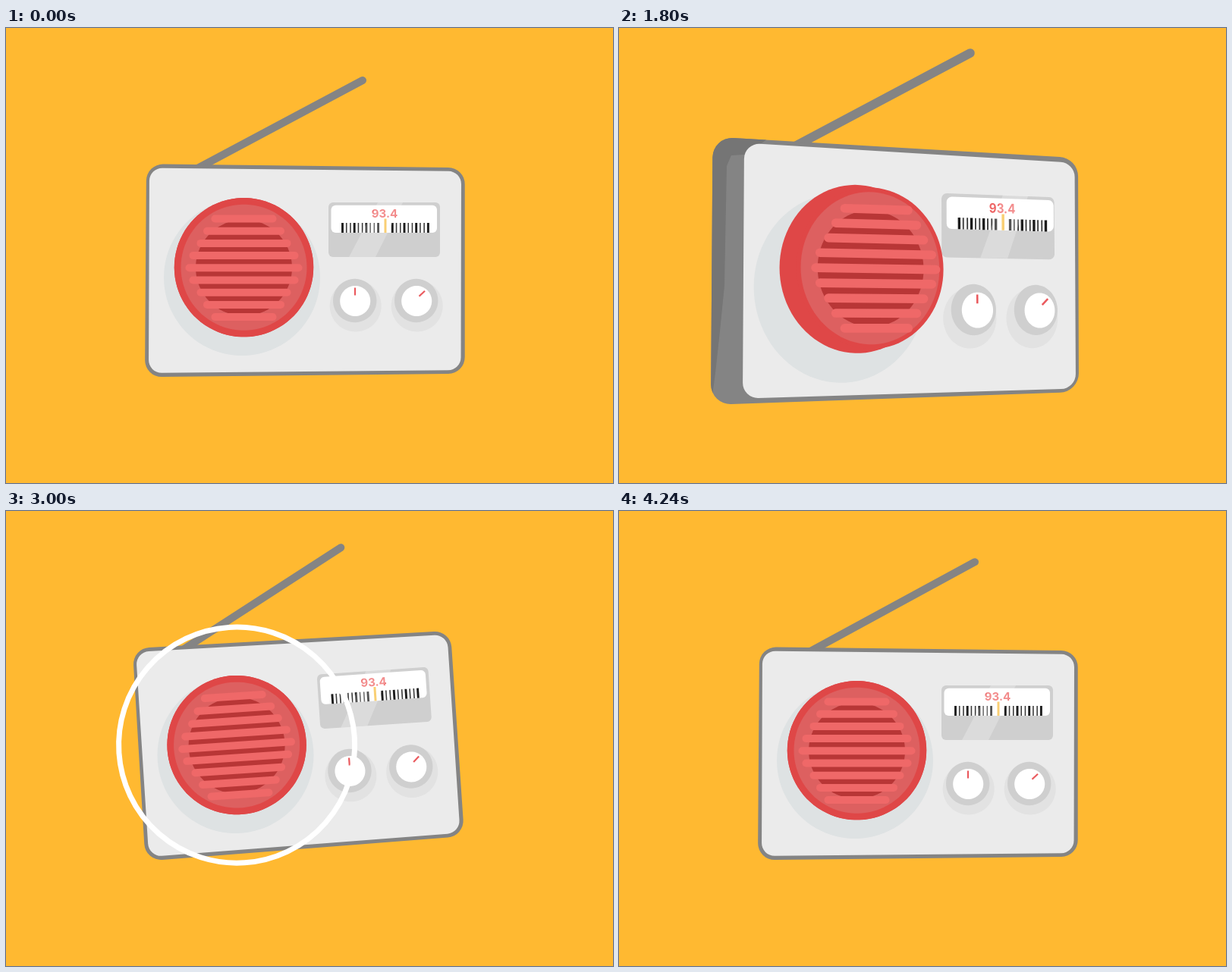
Recreate the animation shown at these times as an HTML page with a canvas. Size 800 px wide and 600 px high, loop 4.28 s.

```html
<!DOCTYPE html>
<html lang="en">
<head>
<meta charset="utf-8">
<title>Radio</title>
<style>
html, body { margin: 0; width: 100%; height: 100%; overflow: hidden; background: #ffb931; }
canvas { display: block; }
</style>
</head>
<body>
<canvas id="stage" width="800" height="600"></canvas>
<script>
const ctx = document.getElementById('stage').getContext('2d');
const LOOP = 4280, CX = 395, CY = 320, ZOOM = 1.165;

// Flat pose and fully turned pose; the turned one includes the zoom.
const FACE = [[189, 184.5], [600, 189], [599.5, 451], [188, 455]];
const FACE_TURNED = [[165, 151.5], [600.5, 178], [602, 475.5], [163, 488.5]];
const BODY = [[185, 179.3], [604.7, 184.2], [604.7, 455.8], [183, 460.3]];
const BODY_TURNED = [[123.5, 143.5], [605, 171.5], [606, 480], [121, 497]];
const SHADE = [[100, 120], [230, 120], [188, 152], [165, 167], [148, 168], [142, 182],
  [139, 340], [133, 400], [127, 455], [123, 485], [100, 490]];

// Keys: time, value pairs
const zoomKeys = [0, 0, 280, 0, 440, .14, 560, .5, 640, .79, 720, .96, 840, 1, 1880, 1,
  2080, .78, 2160, .56, 2240, .37, 2400, .21, 2560, .1, 2840, 0, LOOP, 0];
const turnKeys = [0, 0, 360, 0, 560, .18, 640, .5, 720, .82, 840, .97, 1240, 1.04, 1800, 1,
  1920, .93, 2080, .58, 2240, .18, 2400, .03, 2560, 0, LOOP, 0];
const rockKeys = [0, 0, 2800, 0, 2980, -3.9, 3180, -1.5, 3360, 3.9, 3600, 2.2, 3840, .85, 4080, 0, LOOP, 0];
const hopKeys = [0, 0, 2800, 0, 2980, -13, 3180, -8, 3360, -13, 3600, -3, 3840, 1, 4080, 0, LOOP, 0];
const aerialKeys = [-160, 1.8, 0, 0, 120, -.8, 280, .5, 440, 0, 2800, 0, 2980, 1, 3360, -1.1,
  3600, 1, 3840, -.8, 4120, 1.8, LOOP, 0, 4400, -.8];
const RINGS = [2840, 3280], RING_TIME = 350;

// Smooth monotone interpolation between keys
function track(k, t) {
  const n = k.length / 2;
  let i = 0;
  while (i < n - 2 && t >= k[2 * i + 2]) i++;
  const slope = j => j < 0 || j > n - 2 ? 0 : (k[2 * j + 3] - k[2 * j + 1]) / (k[2 * j + 2] - k[2 * j]);
  const tangent = j => {
    const a = slope(j - 1), b = slope(j);
    return a * b <= 0 ? 0 : 2 * a * b / (a + b);
  };
  const h = k[2 * i + 2] - k[2 * i], u = (t - k[2 * i]) / h, v = 1 - u;
  return v * v * (1 + 2 * u) * k[2 * i + 1] + u * u * (3 - 2 * u) * k[2 * i + 3]
    + h * u * v * (v * tangent(i) - u * tangent(i + 1));
}

// Projective map taking four points to four others
function projection(from, to) {
  const m = [];
  from.forEach(([x, y], i) => {
    const [X, Y] = to[i];
    m.push([x, y, 1, 0, 0, 0, -x * X, -y * X, X], [0, 0, 0, x, y, 1, -x * Y, -y * Y, Y]);
  });
  for (let c = 0; c < 8; c++) {
    let p = c;
    for (let r = c; r < 8; r++) if (Math.abs(m[r][c]) > Math.abs(m[p][c])) p = r;
    [m[c], m[p]] = [m[p], m[c]];
    for (let r = 0; r < 8; r++) {
      if (r === c) continue;
      const f = m[r][c] / m[c][c];
      for (let j = c; j < 9; j++) m[r][j] -= f * m[c][j];
    }
  }
  const h = m.map((row, i) => row[8] / row[i]);
  return (x, y) => {
    const w = h[6] * x + h[7] * y + 1;
    return [(h[0] * x + h[1] * y + h[2]) / w, (h[3] * x + h[4] * y + h[5]) / w];
  };
}

let turn, project;
const unzoom = ([x, y]) => [CX + (x - CX) / ZOOM, CY + (y - CY) / ZOOM];
const blend = (a, b) => {
  const c = unzoom(b);
  return [a[0] + (c[0] - a[0]) * turn, a[1] + (c[1] - a[1]) * turn];
};
// A point on the face, pushed aside by its depth as the radio turns
function at(x, y, depth = 0, drop = 0) {
  const p = project(x, y);
  return [p[0] + depth * turn / ZOOM, p[1] + drop * turn / ZOOM];
}

function path(pts) {
  ctx.beginPath();
  pts.forEach(p => ctx.lineTo(...p));
  ctx.closePath();
}
function fill(color) {
  ctx.fillStyle = color;
  ctx.fill();
}
function rounded(q, radius) {
  ctx.beginPath();
  ctx.moveTo((q[0][0] + q[1][0]) / 2, (q[0][1] + q[1][1]) / 2);
  for (let i = 1; i < 5; i++) ctx.arcTo(...q[i % 4], ...q[(i + 1) % 4], radius);
  ctx.closePath();
}
const rect = (x0, y0, x1, y1, d) => [at(x0, y0, d), at(x1, y0, d), at(x1, y1, d), at(x0, y1, d)];
function disc(x, y, r, color, depth, drop) {
  const pts = [];
  for (let i = 0; i < 90; i++) {
    const a = i * Math.PI / 45;
    pts.push(at(x + r * Math.cos(a), y + r * Math.sin(a), depth, drop));
  }
  path(pts);
  fill(color);
}
function line(a, b, width, color, cap = 'butt') {
  ctx.beginPath();
  ctx.moveTo(...a);
  ctx.lineTo(...b);
  ctx.lineWidth = width;
  ctx.strokeStyle = color;
  ctx.lineCap = cap;
  ctx.stroke();
}

function drawAerial(t) {
  const base = blend([245, 189], [228, 158]), tip = blend([470, 69], [463, 33]);
  const a = -track(aerialKeys, t) * Math.PI / 180;
  const dx = tip[0] - base[0], dy = tip[1] - base[1];
  const end = [base[0] + dx * Math.cos(a) - dy * Math.sin(a), base[1] + dx * Math.sin(a) + dy * Math.cos(a)];
  line(base, end, 10, '#848484', 'round');
}

function drawBody() {
  rounded(BODY.map((p, i) => blend(p, BODY_TURNED[i])), 22);
  fill('#848484');
  ctx.save();
  ctx.clip();
  path(SHADE.map(p => blend([p[0] - 4, unzoom(p)[1]], p)));
  fill('#757575');
  ctx.restore();
  rounded(FACE.map((p, i) => blend(p, FACE_TURNED[i])), 17);
  fill('#ebebeb');
}

function drawSpeaker() {
  const x = 313.5, y = 315.7;
  disc(311, 329, 103, '#dee2e3', -9, 10);
  disc(x, y, 91.7, '#df4747', 9, 1);
  disc(x, y, 91.7 - 3.7 * Math.min(1, turn), '#df4747', 27);
  disc(x, y, 83, '#dd6060', 27);
  disc(x, y + .5, 63.5, '#b83636', 27);
  [77, 72, 62, 53.5, 43].forEach((w, i) => {
    for (const s of i ? [-1, 1] : [1]) {
      const by = 316.3 + s * 16.2 * i;
      line(at(x - w + 5, by, 34), at(x + w - 5, by, 34), 10, '#ef6868', 'round');
    }
  });
}

function drawDisplay() {
  rounded(rect(425, 230, 572, 302), 6);
  fill('#cfcfcf');
  rounded(rect(428.5, 233.7, 568, 270, 3), 6);
  fill('#fff');

  const o = at(499, 245, 4), px = at(500, 245, 4), py = at(499, 246, 4);
  ctx.save();
  ctx.transform(px[0] - o[0], px[1] - o[1], py[0] - o[0], py[1] - o[1], o[0], o[1]);
  ctx.font = '700 15px Inter, Arial, sans-serif';
  ctx.textAlign = 'center';
  ctx.fillStyle = '#ee6666';
  ctx.fillText('93.4', 0, 5.4);
  ctx.restore();

  for (const start of [443.5, 509.3]) {
    for (let i = 0; i < 10; i++) {
      const x = start + 5.23 * i, thick = i % 3 === 0;
      line(at(x, 257, 4), at(x, 270, 4), thick ? 2.9 : 1.6, thick ? '#1c1c1c' : '#3c3c3c');
    }
  }
  line(at(500, 251.5, 4), at(500, 270, 4), 3, '#f7bf45');

  path([at(490, 230, 14), at(523, 230, 14), at(487, 302, 23), at(452, 302, 23)]);
  fill('rgba(255,255,255,.25)');
}

function drawKnob(x, mark) {
  const y = 359.5;
  disc(x + 1, y + 7, 34, '#e2e2e2', 0, 4);
  disc(x, y, 28.7, '#cfcfcf', 6, 1);
  disc(x + .5, y + .5, 20, '#fff', 10.5, 1);
  line(at(mark[0], mark[1], 10.5, 1), at(mark[2], mark[3], 10.5, 1), 2.2, '#ea5a5e');
}

function drawRings(t) {
  for (const start of RINGS) {
    const u = (t - start) / RING_TIME;
    if (u <= 0 || u >= 1) continue;
    ctx.beginPath();
    ctx.arc(313.5, 315.7, 84 + 101 * (1 - (1 - u) ** 2), 0, 2 * Math.PI);
    ctx.lineWidth = 7;
    ctx.strokeStyle = `rgba(255,255,255,${Math.min(1, (1 - u) / .4)})`;
    ctx.stroke();
  }
}

function draw() {
  const t = performance.now() % LOOP;
  turn = track(turnKeys, t);
  project = projection(FACE, FACE.map((p, i) => blend(p, FACE_TURNED[i])));
  const scale = 1 + (ZOOM - 1) * track(zoomKeys, t);

  ctx.setTransform(1, 0, 0, 1, 0, 0);
  ctx.fillStyle = '#ffb931';
  ctx.fillRect(0, 0, 800, 600);

  // Rock on the bottom edge, then zoom
  ctx.translate(394, 458 + track(hopKeys, t));
  ctx.rotate(track(rockKeys, t) * Math.PI / 180);
  ctx.translate(CX - 394, CY - 458);
  ctx.scale(scale, scale);
  ctx.translate(-CX, -CY);

  drawAerial(t);
  drawBody();
  drawDisplay();
  drawKnob(459.7, [460, 342.5, 460, 352.5]);
  drawKnob(540.7, [544.5, 353.7, 552, 346.7]);
  drawSpeaker();
  drawRings(t);
  requestAnimationFrame(draw);
}
draw();
</script>
</body>
</html>
```
